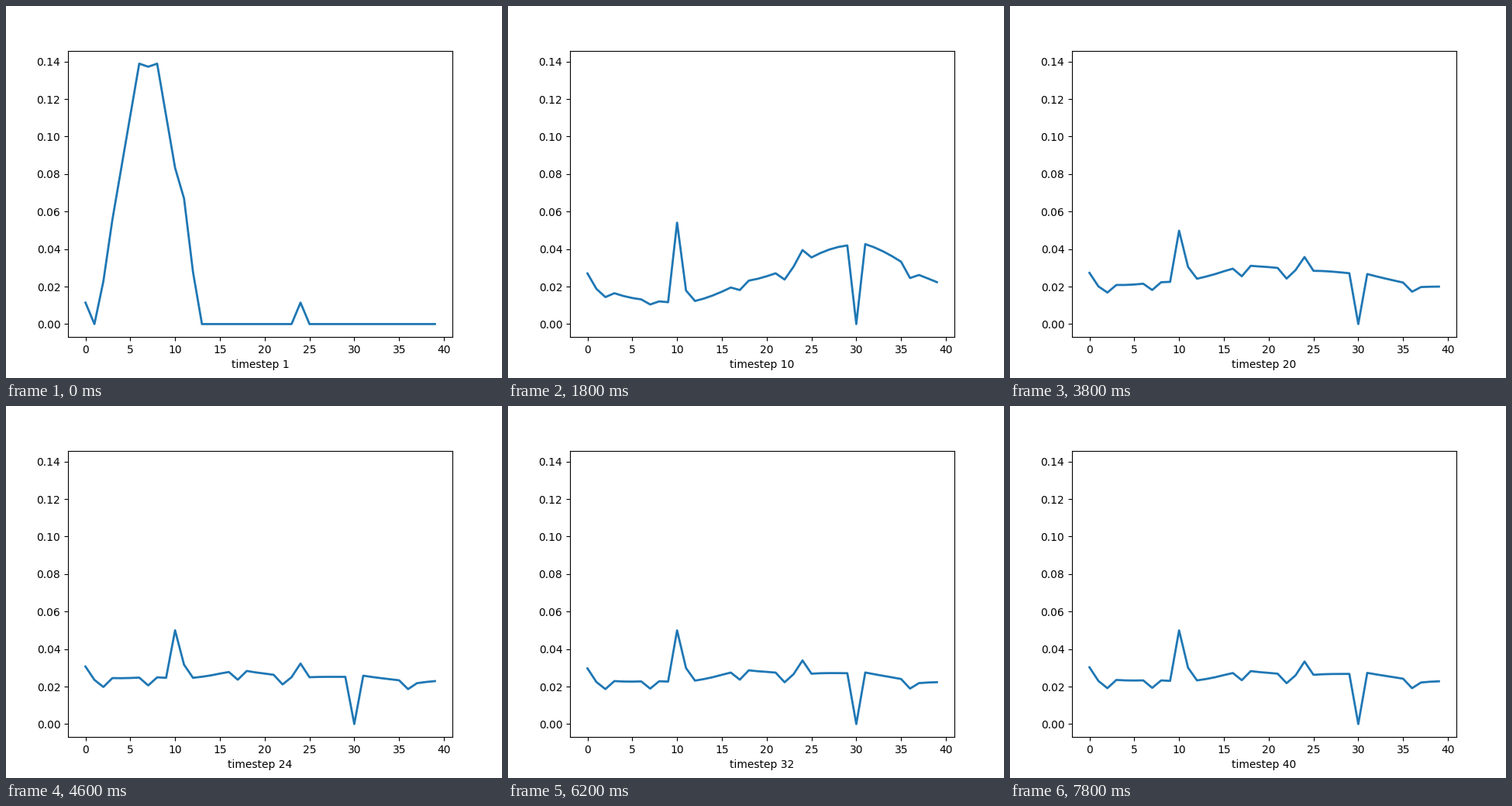
Write a matplotlib script that moves like this. It is 640 by 480 pixels and loops after 8000 ms.

```python
import numpy as np
import matplotlib.pyplot as plt
from matplotlib.animation import FuncAnimation

# Random walk on a 40-square board driven by the sum of two dice.
SQUARES = 40
STEPS = 40
CARD_SQUARES = (2, 7, 17, 22, 36)
CARD_TARGETS = (0, 11, 24)
CARD_PROB = 1 / 17
GO_TO_JAIL, JAIL = 30, 10


def dice_matrix():
    roll = np.zeros((SQUARES, SQUARES))
    for start in range(SQUARES):
        for a in range(1, 7):
            for b in range(1, 7):
                roll[start, (start + a + b) % SQUARES] += 1 / 36
    return roll


def landing_matrix():
    land = np.eye(SQUARES)
    for square in CARD_SQUARES:
        land[square, square] = 1 - len(CARD_TARGETS) * CARD_PROB
        for target in CARD_TARGETS:
            land[square, target] = CARD_PROB
    land[GO_TO_JAIL] = 0
    land[GO_TO_JAIL, JAIL] = 1
    return land


def simulate():
    move = dice_matrix() @ landing_matrix()
    state = np.zeros(SQUARES)
    state[0] = 1
    history = []
    for _ in range(STEPS):
        state = state @ move
        history.append(state)
    return history


history = simulate()

fig, ax = plt.subplots(figsize=(6.4, 4.8), dpi=100)
line, = ax.plot(np.arange(SQUARES), history[0], lw=2)
ax.set_xlim(ax.get_xlim())
ax.set_ylim(ax.get_ylim())


def update(i):
    line.set_ydata(history[i])
    ax.set_xlabel(f"timestep {i + 1}")
    return line,


anim = FuncAnimation(fig, update, frames=STEPS, interval=200,
                     repeat=True, repeat_delay=0)
plt.show()
```
